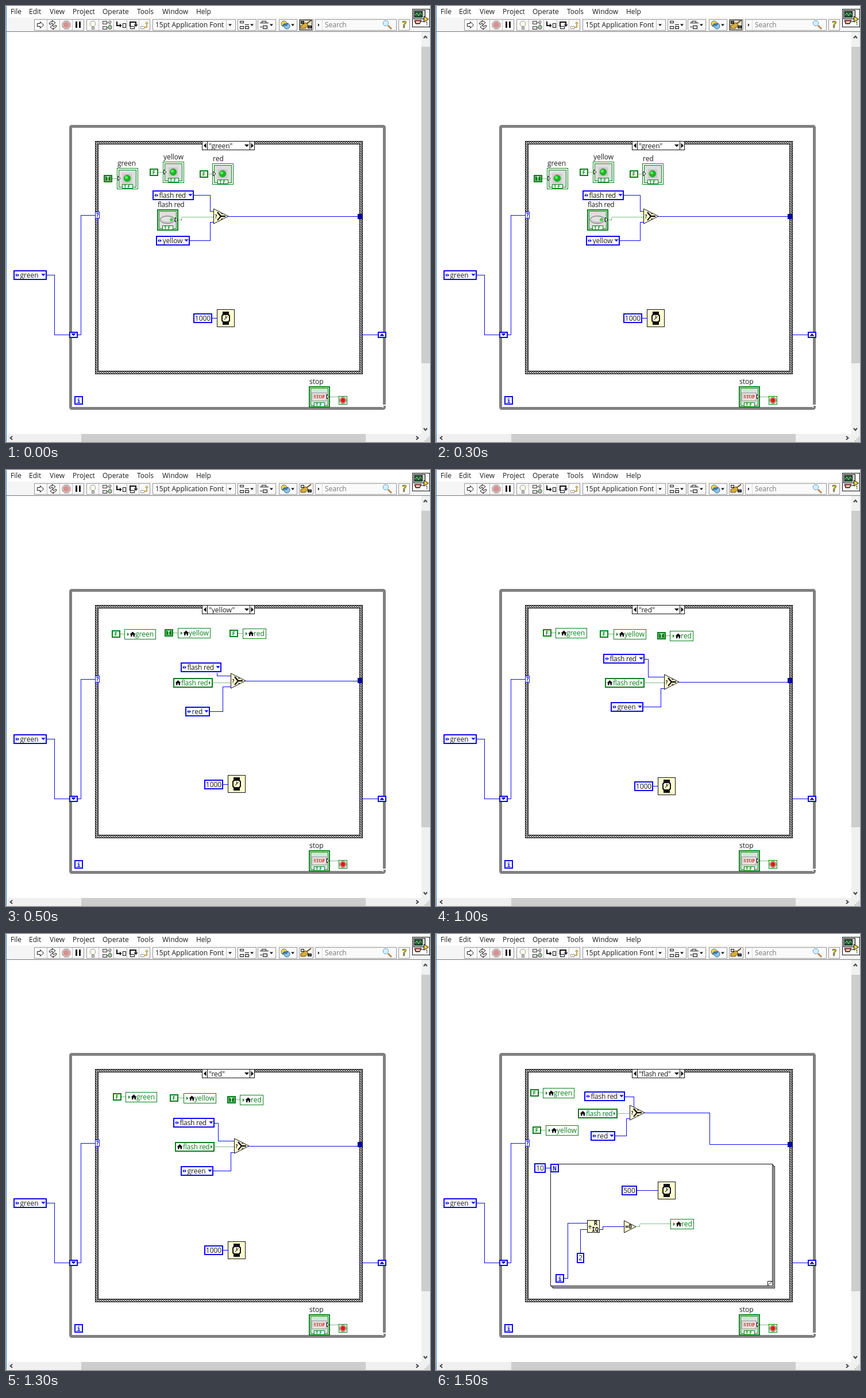
An HTML page for the animation above (2 s loop, 738 by 759 pixels).

```html
<!DOCTYPE html>
<html lang="en">
<head>
<meta charset="utf-8">
<title>Traffic light block diagram</title>
<style>
html, body { margin: 0; width: 100%; height: 100%; overflow: hidden; background: #fff; }
svg { display: block; width: 738px; height: 759px; }
text { font: 12px "Open Sans", "Noto Sans", sans-serif; white-space: pre; }
.crisp { shape-rendering: crispEdges; }
.bold { font-family: "DejaVu Sans Mono", monospace; font-weight: bold; }
</style>
</head>
<body>
<svg id="stage" viewBox="0 0 738 759"></svg>
<script>
const BLUE = '#0a0aee', GREEN = '#0b7f1b', CREAM = '#fffdd0', INK = '#111';

const box = (x, y, w, h, stroke = INK, sw = 1, fill = '#fff') =>
  `<rect class="crisp" x="${x + sw / 2}" y="${y + sw / 2}" width="${w - sw}" height="${h - sw}" fill="${fill}" stroke="${stroke}" stroke-width="${sw}"/>`;
const fillBox = (x, y, w, h, fill) =>
  `<rect class="crisp" x="${x}" y="${y}" width="${w}" height="${h}" fill="${fill}"/>`;
const path = (d, fill = INK, stroke = 'none', sw = 1) =>
  `<path d="${d}" fill="${fill}" stroke="${stroke}" stroke-width="${sw}"/>`;
const label = (x, y, s, fill = '#1c1c1c', extra = '') =>
  `<text x="${x}" y="${y}" fill="${fill}" ${extra}>${s}</text>`;
const bold = (x, y, s, size, fill = INK) =>
  label(x, y, s, fill, `class="bold" text-anchor="middle" style="font-size:${size}px"`);
const circle = (x, y, r, fill, stroke = 'none') =>
  `<circle cx="${x}" cy="${y}" r="${r}" fill="${fill}" stroke="${stroke}"/>`;
const wire = (d, color = BLUE, dash = '') =>
  `<path class="crisp" transform="translate(-.5 .5)" d="M${d}" fill="none" stroke="${color}" stroke-dasharray="${dash}"/>`;
const dots = d => wire(d, GREEN, '1 1');
const down = (x, y, r, fill = INK) => path(`M${x - r} ${y - r / 2}h${2 * r}l${-r} ${r + .5}z`, fill);
const up = (x, y, r, fill = INK) => path(`M${x - r} ${y + r / 2}h${2 * r}l${-r} ${-r - .5}z`, fill);
const right = (x, y, r, fill = INK, stroke) => path(`M${x} ${y - r}v${2 * r}l${r} ${-r}z`, fill, stroke);
const left = (x, y, r, fill = INK) => path(`M${x} ${y - r}v${2 * r}l${-r} ${-r}z`, fill);
// Text with a space sits a little tighter
const tight = s => s.includes(' ') ? 'letter-spacing="-.25"' : '';

const ring = (x, y, w, s, h = 17) => box(x, y, w, h, BLUE, 2) +
  left(x + 6, y + 8.5, 2.8, BLUE) + right(x + 7, y + 8.5, 2.8, BLUE) +
  label(x + 11.5, y + 13, s, '#1c1c1c', tight(s)) + down(x + w - 6, y + 8, 3.6, BLUE);
const num = (x, y, w, s, h = 17) => box(x, y, w, h, BLUE, 2) +
  label(x + w / 2, y + 13, s, '#1c1c1c', 'text-anchor="middle"');
const glyph = (x, y, s) => box(x, y, 15, 15, BLUE, 2) + bold(x + 7.5, y + 11.5, s, 11, BLUE);
const bool = (x, y, s) => s === 'T'
  ? box(x, y, 15, 13, GREEN, 2, GREEN) + box(x + 2, y + 2, 11, 9, '#8cc796', 1, GREEN) + bold(x + 7.5, y + 9.5, 'T', 8, '#fff')
  : box(x, y, 15, 13, GREEN, 2) + bold(x + 7.5, y + 10, 'F', 9, GREEN);
const house = (x, y) => path(`M${x - 5} ${y}l5 -4.500 5 4.500h-1.500v4h-2.500v-3h-2v3h-2.500v-4z`);
const setter = (x, y, w, s) => box(x, y, w, 18, GREEN) +
  right(x + 5, y + 9, 3, GREEN) + house(x + 14.5, y + 9) + label(x + 19, y + 13, s, GREEN);
const getter = (x, y) => box(x, y, 69, 17, GREEN, 2) + house(x + 8.5, y + 8.5) +
  label(x + 14, y + 12.5, 'flash red', GREEN, tight(' ')) + right(x + 62, y + 8.5, 3, GREEN);
const assign = (x, y, v, lx, ly, w, s) =>
  dots(`${x + 15} ${y + 6}H${lx + 1}`) + bool(x, y, v) + setter(lx, ly, w, s);

const select = (x, y) => path(`M${x + .5} ${y - 13}v26l25.5 -13z`, CREAM, INK) +
  bold(x + 4.5, y + 3.5, '?', 8) + path(`M${x + 7} ${y - 7}l6 7h8`, 'none', INK, 2.6) +
  path(`M${x + 13} ${y}l-6 7`, 'none', INK, 2) +
  path(`M${x + 13} ${y - 4.5}h3M${x + 13} ${y + 4.5}h3`, 'none', INK);
const watch = (x, y) => box(x, y, 31, 31, INK, 1, CREAM) +
  fillBox(x + 10, y + 4, 11, 23, INK) +
  path(`M${x + 11} ${y + 7}h9l3 4v9l-3 4h-9l-3 -4v-9z`) +
  path(`M${x + 12} ${y + 10}h7l2 2v7l-2 2h-7l-2 -2v-7z`, CREAM) +
  path(`M${x + 15.5} ${y + 11}v5l-3 2M${x + 15.5} ${y + 16}l3 -4`, 'none', INK);

const terminal = (x, y, sw) => box(x, y, 37, 37, GREEN, sw) +
  box(x + 3, y + 3, 31, 31, GREEN, 1, '#dedede') +
  box(x + 9, y + 28, 19, 8, GREEN) + label(x + 18.5, y + 35, 'TF', GREEN,
    'class="bold" text-anchor="middle" letter-spacing="2" style="font-size:7.5px"');
const led = (x, y, s) => terminal(x, y, 1) + label(x + 1, y - 4, s) +
  right(x + 2, y + 18, 4, '#fff', INK) + box(x + 10, y + 10, 16, 16, '#c4c4c4', 1, '#d0d0d0') +
  circle(x + 18, y + 18, 6, '#12b91d', '#6f956f') + circle(x + 16.5, y + 16.5, 2.6, '#5cee5c');

const caseName = s => label(353, 248, `"${s}"`, '#1c1c1c', tight(s));

function toolbar() {
  const menu = [['File', 8], ['Edit', 40], ['View', 76], ['Project', 116], ['Operate', 168],
    ['Tools', 228], ['Window', 272], ['Help', 331]];
  const groups = [[49, 87], [140, 111], [255, 145], [403, 33], [438, 32], [475, 32], [510, 25], [538, 142], [683, 20]];
  let s = fillBox(0, 20, 738, 25, '#f5f5f5') + fillBox(0, 44, 738, 1, '#777');
  s += menu.map(([m, x]) => label(x, 14, m)).join('');
  s += groups.map(([x, w]) => box(x, 23, w, 20, '#9a9a9a', 1, '#fafafa')).join('');
  s += [71, 93, 115, 161, 187, 210, 231, 383].map(x => fillBox(x, 24, 1, 18, '#bdbdbd')).join('');
  // run, run again, abort, pause
  s += path('M54.500 30.500h5v-3l6 5.500 -6 5.500v-3h-5z', '#fff', INK);
  s += path('M75 31q1-4 6-4l-1-2 6 4 -4 4 -1-3q-3 0-3 2zM88 34q-1 5-6 5l1 2-6-4 4-4 1 3q3 0 3-2z', '#fff', INK);
  s += path('M102 26h6l4 4v6l-4 4h-6l-4-4v-6z', '#d3c3c3', '#a09090') + circle(105, 33, 5, '#d98f8f');
  s += fillBox(121, 27, 3, 11, INK) + fillBox(127, 27, 3, 11, INK);
  // bulb, retain values, steps
  s += circle(151, 31, 4.8, '#fcfce8', '#999') + box(149, 36, 5, 5, '#888', 1, '#ccc');
  s += box(168, 26, 8, 6, '#444', 1, '#ddd') + box(168, 35, 8, 6, '#444', 1, '#ddd') +
    path('M176 29h5v6M176 38h3', 'none', '#444') + circle(181, 37, 3.2, '#a9d3a9', '#444') + circle(181, 28, 2, '#fff', '#444');
  s += path('M193 27v7h8', 'none', INK, 2) + right(198, 34, 3.5) + box(203, 30, 6, 8, INK);
  s += path('M216 36v-8h10v4', 'none', INK, 2) + down(226, 34, 3.5) + box(216, 35, 8, 5, INK);
  s += box(234, 35, 7, 5, '#999') + path('M241 37h4v-6', 'none', '#c9a94c', 2) + up(245, 29, 3.5, '#c9a94c');
  s += label(260, 37, '15pt Application Font') + down(390, 33, 3);
  // align, distribute, reorder
  s += box(407, 26, 7, 4, INK) + box(407, 35, 7, 5, INK) + path('M416 32.500h7', 'none', INK) + box(416, 35, 7, 5, INK, 1, '#ddd') + down(428, 33, 3);
  s += path('M442 29.500h15M442 36.500h4', 'none', INK) + box(445, 26, 8, 4, INK) + box(447, 34, 8, 6, INK, 1, '#ddd') + down(462, 33, 3);
  s += circle(484, 31, 5, '#e9d757', '#6b7429') + circle(489, 35, 5, '#8fc5e7', '#356d97') +
    path('M481 35l4-4 3 4M491 30l-4 4', 'none', '#286aa0', 2) + down(499, 33, 3);
  // search, help
  s += right(543, 33, 2.6) + fillBox(550, 24, 1, 18, '#ddd') + label(555, 37, 'Search', '#777');
  s += path('M665 34l6 6', 'none', '#b98b4e', 3) + circle(661, 30, 4.7, '#d8efff', '#5b9dcf');
  s += label(693, 38, '?', '#e0bd00', 'class="bold" text-anchor="middle" stroke="#333" stroke-width=".6" style="font-size:16px"');
  // icon pane
  s += box(707, 5, 31, 32, INK) + box(709, 7, 21, 16, INK, 1, '#ccc') + box(711, 9, 14, 11, INK, 1, '#245b34') +
    path('M712 16l3-4 3 5 3-5 3 3', 'none', '#8cdb8c') + path('M727.500 18v10l8-5z', '#f1d338', INK) +
    path('M711 25h12l-3 6h-7z', '#d84b43', INK) + fillBox(714, 27, 6, 2, '#fff') +
    path('M723 27h4', 'none', INK) + label(730, 34, '1', INK, 'style="font-size:9px"');
  return s;
}

function scrollbars() {
  const arrow = (x, y, turn) => `<path transform="translate(${x} ${y}) rotate(${turn})" d="M-3 2L0 -1.500 3 2" fill="none" stroke="#444" stroke-width="2"/>`;
  let s = fillBox(723, 45, 15, 714, '#f0f0f0') + fillBox(1, 745, 737, 14, '#f0f0f0') +
    fillBox(723, 71, 15, 551, '#cdcdcd') + fillBox(131, 745, 495, 14, '#cdcdcd') +
    arrow(730, 54, 0) + arrow(730, 737, 180) + arrow(9, 752, -90) + arrow(716, 752, 90);
  for (let i = 0; i < 3; i++)
    for (let j = 0; j <= i; j++) s += fillBox(735 - j * 3, 750 + i * 3, 2, 2, '#b5b5b5');
  return s;
}

function frame() {
  let s = '<defs><pattern id="hatch" width="4" height="4" patternUnits="userSpaceOnUse">' +
    '<rect width="4" height="4" fill="#fff"/><path d="M-1 -1L5 5M5 -1L-1 5" stroke="#222" stroke-width="1.1"/></pattern></defs>';
  s += '<rect x="112.500" y="209.500" width="546" height="491" rx="2" fill="none" stroke="#808080" stroke-width="5"/>';
  s += fillBox(655, 694, 7, 2, '#fff') + fillBox(655, 694, 2, 5, '#fff');
  s += box(155, 235, 466, 406, INK, 6, '#fff') + box(156, 236, 464, 404, 'url(#hatch)', 4, 'none');
  s += box(341, 235, 92, 16) + fillBox(350, 235, 1, 16, INK) + fillBox(424, 235, 1, 16, INK) +
    left(348.5, 243, 4.5) + right(426.5, 243, 4.5) + down(419, 243, 4);
  s += wire('70 468H85V572H111') + wire('124 572H131V364H157') + wire('621 572H648');
  s += ring(13, 460, 58, 'green');
  s += box(110, 567, 15, 11, BLUE, 2) + down(117.5, 572, 4, '#0000a8') +
    box(647, 567, 15, 11, BLUE, 2) + up(654.5, 572.5, 4, '#0000a8');
  s += box(155, 358, 8, 12, BLUE) + bold(159, 368, '?', 10, BLUE);
  s += glyph(119, 679, 'i');
  s += label(528, 658, 'stop') + dots('564 680H580') + terminal(527, 662, 2) +
    box(532, 673, 26, 15, '#999', 1, '#e8dede') +
    label(545, 683, 'STOP', '#e01b24', 'text-anchor="middle" style="font:bold 7.5px \'Liberation Serif\', serif"') +
    right(558.5, 680, 4, '#fff', INK);
  s += box(579, 679, 15, 15, GREEN, 1, CREAM) + circle(586.5, 686.5, 5.5, '#fff', '#444') + circle(586.5, 686.5, 4.2, '#e81818');
  return s;
}

const tunnel = () => box(612, 362, 8, 9, '#000070', 1, '#0000b4');
const broom = framed => (framed ? box(511, 24, 22, 18, '#333', 1, '#e6e0cc') : '') +
  path('M531 25l-8 6', 'none', '#6b4a14', 2) + path('M513 34l9-5 4 4 -5 6h-8z', '#d9ad3c', '#5d4510') +
  box(513, 26, 6, 5, INK, 1, framed ? '#555' : '#eee') + box(525, 34, 7, 5, INK, 1, '#555');

const states = [
  () => broom(true) + caseName('green') +
    dots('185 300H194') + dots('264 289H274') + dots('351 292H360') +
    bool(170, 294, 'T') + bool(250, 283, 'F') + bool(337, 286, 'F') +
    led(193, 282, 'green') + led(273, 271, 'yellow') + led(359, 274, 'red') +
    wire('326 329H356V357H362') + wire('320 408H356V376H362') + wire('386 366H613') + dots('299 372H306V367H362') +
    ring(255, 321, 72, 'flash red') + ring(261, 400, 59, 'yellow') +
    label(264, 350, 'flash red', '#1c1c1c', tight(' ')) + terminal(263, 354, 2) +
    '<ellipse cx="281" cy="372" rx="13" ry="6.500" fill="#c9c9c9" stroke="#777"/><ellipse cx="280" cy="371" rx="10" ry="4" fill="#e2e2e2"/>' +
    circle(288, 372, 2.8, '#3fd33f') + right(294.5, 372, 4, '#fff', INK) + select(361, 366) +
    wire('358 543H368') + num(326, 535, 33, '1000') + watch(367, 528),

  () => broom() + caseName('yellow') +
    assign(184, 279, 'F', 206, 277, 55, 'green') + assign(276, 277, 'T', 299, 275, 57, 'yellow') + assign(389, 278, 'F', 412, 276, 41, 'red') +
    wire('368 352V358H392') + wire('355 420H378V377H392') + wire('416 367H613') + dots('359 370H392') +
    ring(304, 335, 71, 'flash red') + getter(291, 362) + ring(312, 412, 43, 'red') + select(391, 367) +
    wire('378 547H387') + num(345, 539, 33, '1000') + watch(386, 531),

  () => broom() + caseName('red') +
    assign(186, 277, 'F', 208, 275, 55, 'green') + assign(285, 279, 'F', 309, 277, 57, 'yellow') + assign(385, 282, 'T', 407, 280, 41, 'red') +
    wire('362 329H370V360H398') + wire('360 412H392V380H398') + wire('422 369H613') + dots('362 370H398') +
    ring(291, 320, 72, 'flash red') + getter(294, 362) + ring(304, 404, 57, 'green') + select(397, 369) +
    wire('378 550H387') + num(345, 542, 33, '1000') + watch(386, 535),

  () => broom() + caseName('flash red') +
    assign(164, 270, 'F', 186, 268, 55, 'green') + assign(168, 335, 'F', 191, 333, 57, 'yellow') +
    wire('329 283H345V302H339') + wire('312 351H332V321H338') + wire('362 311H477V366H613') + dots('315 312H338') +
    ring(258, 274, 71, 'flash red') + getter(247, 304) + ring(269, 343, 43, 'red') + select(337, 311) +
    box(203, 404, 387, 213) + box(201, 402, 387, 213) + box(199, 400, 387, 213) +
    path('M577.500 612v-7.500h8M577.500 612l8-8', 'none', INK) +
    wire('190 407H200') + num(171, 399, 20, '10') + glyph(199, 400, 'N') +
    wire('349 446H387') + num(323, 438, 27, '500') + watch(386, 431) +
    wire('223 599H230V503H264') + wire('252 555V514H264') + wire('285 514H291V509H328') +
    dots('348 509H355V504H409') + glyph(208, 592, 'i') + num(245, 555, 13, '2', 18) +
    box(263, 498, 22, 22, INK, 1, CREAM) + bold(268, 513, '÷', 10) + bold(278, 507, 'R', 10) + bold(277, 518, 'IQ', 10) +
    path('M327.500 499v21l20.500 -10.500z', CREAM, INK) + bold(335, 513, '=0', 10) +
    setter(408, 496, 41, 'red'),
];

const stage = document.getElementById('stage');
stage.innerHTML = fillBox(0, 0, 738, 759, '#fff') + toolbar() + scrollbars() + frame() +
  states.map(s => `<g class="state">${s()}</g>`).join('') + tunnel() + fillBox(0, 0, 1, 759, '#3a86d8');
const layers = [...stage.querySelectorAll('.state')];

function draw(ms) {
  const now = Math.floor(ms % 2000 / 500);
  layers.forEach((g, i) => g.setAttribute('display', i === now ? 'inline' : 'none'));
}

const start = performance.now();
function tick() {
  draw(performance.now() - start);
  requestAnimationFrame(tick);
}
tick();
</script>
</body>
</html>
```
